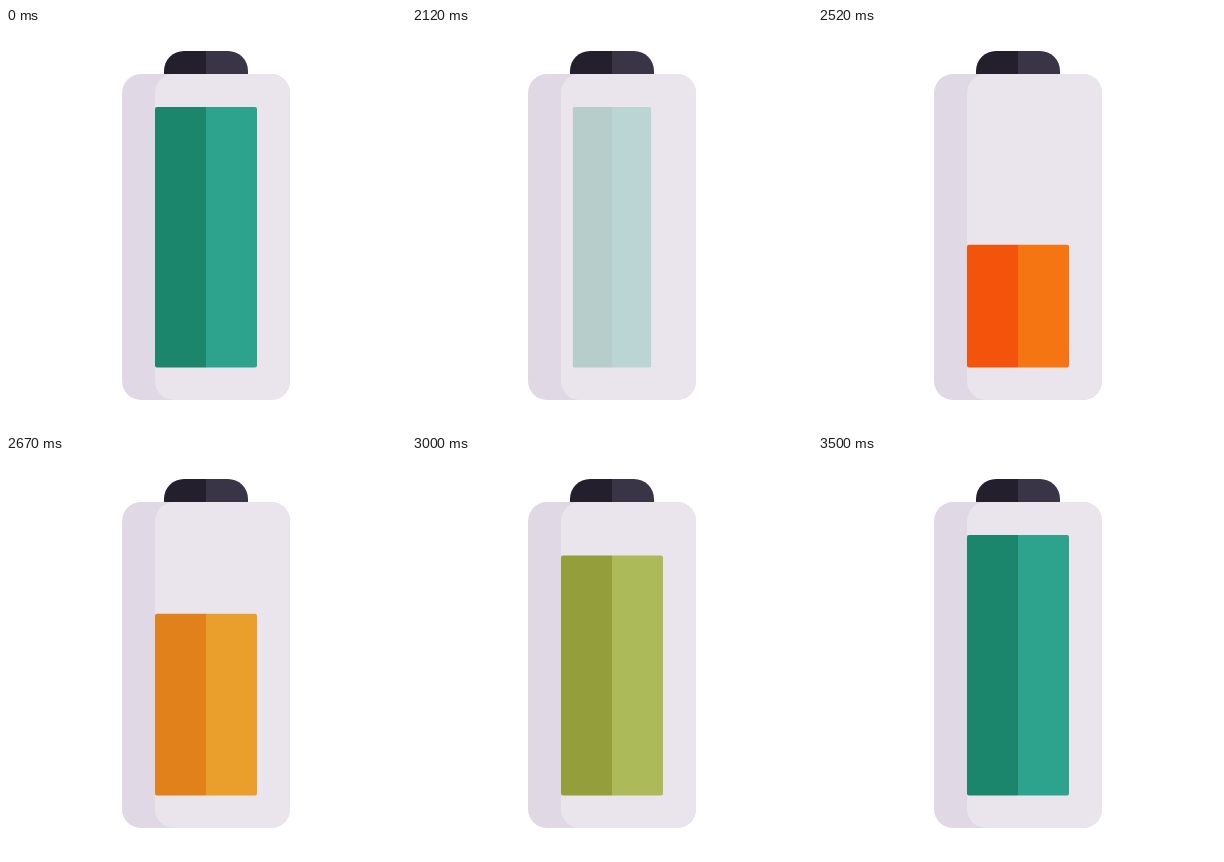
An HTML page that plays this animation: 400x400 px, repeating every 3.52 s.

```html
<!DOCTYPE html>
<html lang="en">
<head>
<meta charset="utf-8">
<title>Battery charging</title>
<style>
  html, body { margin: 0; width: 100%; height: 100%; overflow: hidden; background: #fff; }
  svg { display: block; width: 100vw; height: 100vh; }
</style>
</head>
<body>
<svg viewBox="0 0 400 400">
  <clipPath id="window"><rect id="level" x="149" width="102" rx="2"/></clipPath>
  <path fill="#241f2c" d="M158 47V43A20 20 0 0 1 178 23H200V47Z"/>
  <path fill="#393446" d="M200 23H222A20 20 0 0 1 242 43V47H200Z"/>
  <rect x="116" y="46" width="168" height="326" rx="19" fill="#e0d9e5"/>
  <rect x="149" y="46" width="135" height="326" rx="19" fill="#eae5ec"/>
  <g id="charge">
    <g clip-path="url(#window)">
      <rect id="dark" x="149" y="79" width="51" height="261"/>
      <rect id="light" x="200" y="79" width="51" height="261"/>
    </g>
  </g>
</svg>
<script>
const LOOP = 3520, FADE_START = 2000, FADE_TIME = 160, GROW_START = 2170, GROW_END = 3500;
const BOTTOM = 339.5, FULL = 260.5;

// Level, dark half, light half
const STOPS = [
  [0, [229, 48, 24], [240, 76, 36]],
  [0.469, [243, 82, 10], [245, 117, 18]],
  [0.892, [210, 169, 41], [224, 194, 68]],
  [0.946, [96, 151, 76], [128, 179, 108]],
  [1, [28, 134, 109], [45, 163, 142]]
];

const byId = id => document.getElementById(id);
const [charge, level, dark, light] = ["charge", "level", "dark", "light"].map(byId);
const clamp = v => Math.min(1, Math.max(0, v));

// cubic-bezier(.3, 0, .1, 1)
function ease(x) {
  if (x <= 0 || x >= 1) return clamp(x);
  const curve = (s, a, b) => 3 * (1 - s) ** 2 * s * a + 3 * (1 - s) * s * s * b + s ** 3;
  let lo = 0, hi = 1;
  for (let i = 0; i < 30; i++) {
    const mid = (lo + hi) / 2;
    if (curve(mid, 0.3, 0.1) < x) lo = mid; else hi = mid;
  }
  return curve(lo, 0, 1);
}

function colorAt(value, side) {
  const i = Math.max(1, STOPS.findIndex(stop => stop[0] >= value));
  const from = STOPS[i - 1], to = STOPS[i];
  const k = (value - from[0]) / (to[0] - from[0]);
  return `rgb(${from[side].map((c, n) => Math.round(c + (to[side][n] - c) * k))})`;
}

function draw(time) {
  const growing = time >= GROW_START;
  const value = growing ? ease((time - GROW_START) / (GROW_END - GROW_START)) : 1;
  const fade = growing ? 0 : clamp((time - FADE_START) / FADE_TIME);
  const scale = 1 - 0.4 * fade * fade;

  level.setAttribute("y", BOTTOM - FULL * value);
  level.setAttribute("height", FULL * value);
  dark.setAttribute("fill", colorAt(value, 1));
  light.setAttribute("fill", colorAt(value, 2));
  charge.setAttribute("opacity", 1 - fade);
  charge.setAttribute("transform", `translate(${200 * (1 - scale)} 0) scale(${scale} 1)`);
}

function tick() {
  draw(performance.now() % LOOP);
  requestAnimationFrame(tick);
}
tick();
</script>
</body>
</html>
```
